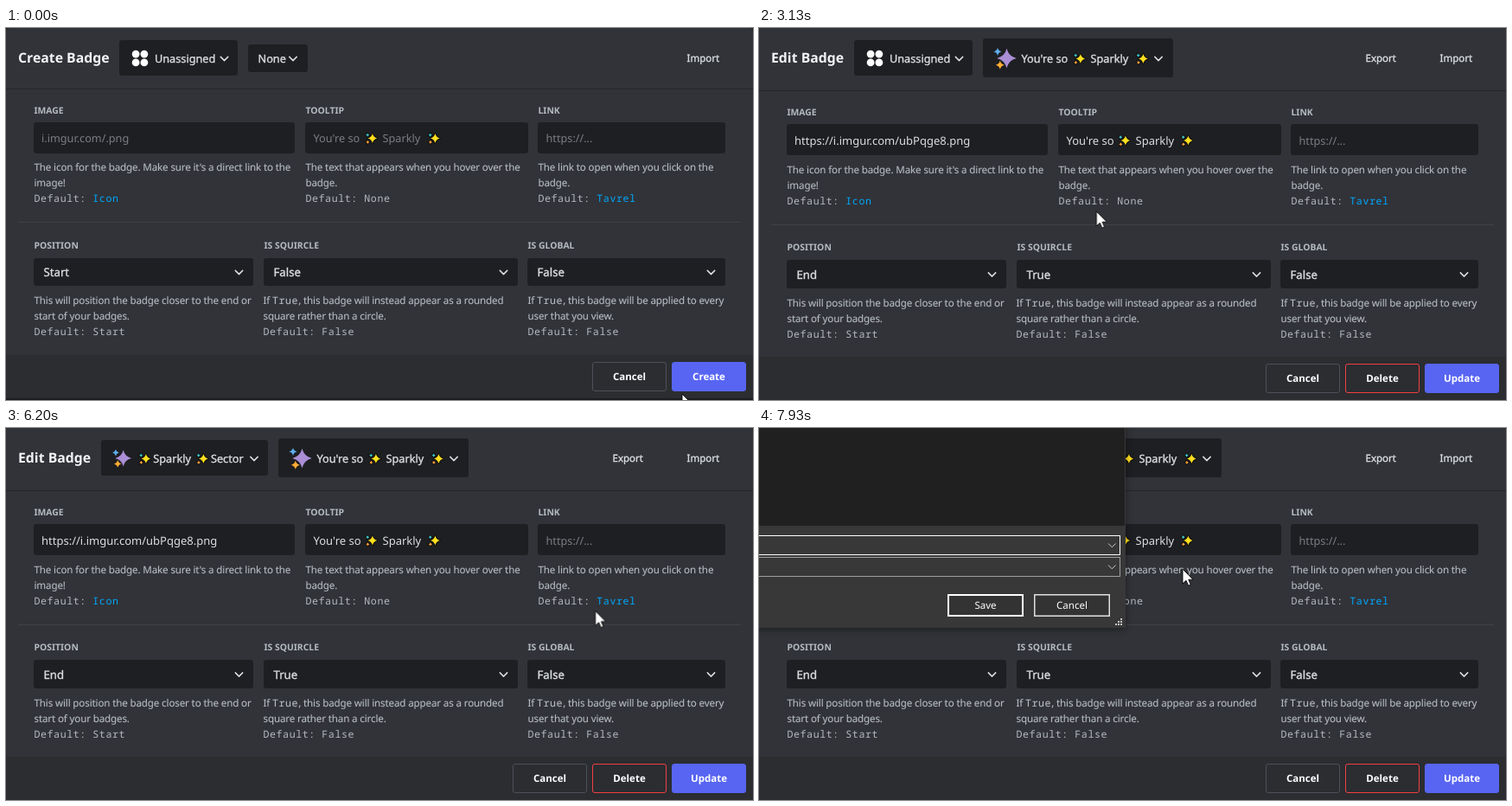
An HTML page for the animation above (8 s loop, 864x430 px).

```html
<!DOCTYPE html>
<html lang="en">
<head>
<meta charset="utf-8">
<title>Badge editor</title>
<style>
html, body { margin: 0; width: 100%; height: 100%; overflow: hidden; background: #1b1c1f; }
svg { display: block; width: 100%; height: 100%; }
text { font: 12.7px "Noto Sans", "Open Sans", sans-serif; fill: #dbdee1; text-rendering: geometricPrecision; white-space: pre; }
.title { font-size: 15.8px; font-weight: 700; fill: #f2f3f5; }
.label { font-size: 10.4px; font-weight: 700; fill: #b5bac1; }
.help { font-size: 11.6px; letter-spacing: -.14px; fill: #b5bac1; stroke: #b5bac1; stroke-width: .12px; }
.mono { font-family: "Noto Sans Mono", "DejaVu Sans Mono", monospace; font-size: 11.6px; letter-spacing: .58px; fill: #b5bac1; }
.link { fill: #00a8fc; }
.hint { font-size: 12.7px; fill: #7a7d84; }
.value { font-size: 13px; }
.pick { font-size: 13.2px; }
.nav { font-size: 11.5px; }
.pick, .head, .nav { stroke: #dbdee1; stroke-width: .35px; }
.btn { font-size: 11.5px; font-weight: 600; fill: #fff; text-anchor: middle; }
.row { font-size: 12.8px; fill: #a9adb4; }
.strong { font-size: 12.3px; font-weight: 600; }
.white { fill: #fff; }
.win { font-size: 11.5px; fill: #fff; text-anchor: middle; }
.chev { fill: none; stroke: #dbdee1; stroke-width: 1.5; stroke-linecap: round; stroke-linejoin: round; }
.timed { animation: 8s step-end infinite; }
#cursor { animation: move 8s linear infinite; }
#dialog { filter: drop-shadow(0 2px 4px rgba(0, 0, 0, .4)); }
</style>
</head>
<body>
<svg id="stage" viewBox="0 0 864 430" xmlns="http://www.w3.org/2000/svg"></svg>
<script>
const LOOP = 8000;
const DARK = '#1e1f22', PANEL = '#2b2d31', BLURPLE = '#5865f2';

const text = (x, y, s, cls) => `<text x="${x}" y="${y}" class="${cls}">${s}</text>`;
const rect = (x, y, x2, y2, fill, rest = '') =>
  `<rect x="${x}" y="${y}" width="${x2 - x}" height="${y2 - y}" fill="${fill}" ${rest}/>`;
const outline = (x, y, x2, y2, fill, color, w = 1, rx = 0) =>
  rect(x + w / 2, y + w / 2, x2 - w / 2, y2 - w / 2, fill, `stroke="${color}" stroke-width="${w}" rx="${rx}"`);
const chevron = (x, y, up) =>
  `<path class="chev" d="M${x - 4.2} ${y + (up ? 2.1 : -2.1)}l4.2 ${up ? -4.2 : 4.2} 4.2 ${up ? 4.2 : -4.2}"/>`;
const timed = (id, body) => `<g id="${id}" class="timed">${body}</g>`;

function star(x, y, r, fill, edge = '') {
  const k = r * .2;
  return `<path transform="translate(${x} ${y})" fill="${fill}" ${edge}
    d="M0 ${-r}Q${k} ${-k} ${r} 0Q${k} ${k} 0 ${r}Q${-k} ${k} ${-r} 0Q${-k} ${-k} 0 ${-r}Z"/>`;
}

function emoji(x, y) {
  const edge = 'stroke="#101010" stroke-width="2" stroke-linejoin="round" paint-order="stroke"';
  return star(x - 4.3, y - 3.8, 2.1, '#3fc6c9', edge) + star(x - 4.1, y + 4.4, 2.1, '#f7a03c', edge) +
    star(x + 1.4, y, 5.4, '#ffdf1e', edge);
}

// Purple sparkle icon, about 25px wide at scale 1
const sparkle = (x, y, s = 1) => `<g transform="translate(${x} ${y}) scale(${s})">` +
  star(2, 0, 11.3, '#aa8ed6') + star(-8.5, -7.7, 4.6, '#5dadec') + star(-5.7, 7.8, 5, '#ffac33') + '</g>';

const dots = (x, y) => [[-4.9, -4.9], [4.9, -4.9], [-4.9, 4.9], [4.9, 4.9]]
  .map(([a, b]) => `<circle cx="${x + a}" cy="${y + b}" r="4.4" fill="#fff"/>`).join('');

const rosette = (x, y) => `<g transform="translate(${x} ${y})" fill="#fff">
  <path d="M-6 4L-9.5 13.5L-5 12.5L-2.2 15L0 9L2.2 15L5 12.5L9.5 13.5L6 4Z"/>
  <circle cy="-2" r="10.8"/><circle cy="-2" r="8" fill="none" stroke="${PANEL}" stroke-width="1.6"/></g>`;

const check = (x, y) => `<circle cx="${x}" cy="${y}" r="8.3" fill="${BLURPLE}"/>
  <path d="M${x - 3.7} ${y + .2}l2.6 2.7 4.8-5.2" fill="none" stroke="#fff" stroke-width="1.7"/>`;

function button(x, y, label, fill, edge) {
  return outline(x, y, x + 86, y + 34, fill, edge, 1, 2.5) + text(x + 43, y + 21, label, 'btn');
}

function help(x, y, lines, value, link) {
  return lines.map((s, i) => text(x, y + 18 * i, s, 'help')).join('') +
    text(x, y + 36, `Default: <tspan class="${link ? 'link' : ''}">${value}</tspan>`, 'mono');
}

const sparkly = (x, y, cls) => text(x, y, "You're so", cls) + emoji(x + 67, y - 4.5) +
  text(x + 80, y, 'Sparkly', cls) + emoji(x + 139.5, y - 4.5);

// Modal body shared by both modes; d shifts boxes and t shifts text
function form(edit) {
  const d = edit ? 2 : 0, t = edit ? 2.5 : 0;
  const cols = [[32, 334], [346, 604], [615, 832]], picks = [[32, 286], [298, 592], [603, 832]];
  const chosen = edit ? ['End', 'True', 'False'] : ['Start', 'False', 'False'];
  const code = s => `If <tspan class="mono">True</tspan>, ${s}`;
  const rule = Math.round(224 + t);
  let s = rect(0, -d, 864, 428 + d, '#313338', 'rx="4"') +
    rect(0, 378 + d, 864, 428 + d, PANEL) +
    rect(0, 70 + d, 864, 71 + d, '#25262a') + rect(14, rule, 850, rule + 1, '#3f4147');
  cols.forEach(([a, b], i) => {
    s += rect(a, 109 + d, b, 145 + d, DARK, 'rx="3"') +
      text(a + .5, 99 + d, ['IMAGE', 'TOOLTIP', 'LINK'][i], 'label');
  });
  picks.forEach(([a, b], i) => {
    s += rect(a, 266 + d, b, Math.round(298 + t), DARK, 'rx="3"') +
      text(a + .5, 255 + d, ['POSITION', 'IS SQUIRCLE', 'IS GLOBAL'][i], 'label') +
      text(a + 11.5, 287 + t, chosen[i], 'pick') + chevron(b - 16.5, 282.5 + t);
  });
  const cls = edit ? 'value' : 'hint';
  s += text(41, 132 + t, edit ? 'https://i.imgur.com/ubPqge8.png' : 'i.imgur.com/.png', cls) +
    sparkly(355.5, 132 + t, cls) + text(624.5, 132 + t, 'https://...', 'hint') +
    help(32.5, 165 + t, ["The icon for the badge. Make sure it's a direct link to the", 'image!'], 'Icon', true) +
    help(346.5, 165 + t, ['The text that appears when you hover over the', 'badge.'], 'None') +
    help(615.5, 165 + t, ['The link to open when you click on the', 'badge.'], 'Tavrel', true) +
    help(32.5, 319 + t, ['This will position the badge closer to the end or', 'start of your badges.'], 'Start') +
    help(297.5, 319 + t, [code('this badge will instead appear as a rounded'), 'square rather than a circle.'], 'False') +
    help(603.5, 319 + t, [code('this badge will be applied to every'), 'user that you view.'], 'False') +
    text(14, 40, edit ? 'Edit Badge' : 'Create Badge', 'title') + text(787.5, 39, 'Import', 'nav') +
    button(edit ? 586 : 678, 386 + d, 'Cancel', 'none', '#4e5058') +
    button(770, 386 + d, edit ? 'Update' : 'Create', BLURPLE, BLURPLE);
  if (edit) s += button(678, 388, 'Delete', 'none', '#f23f43') + text(701.5, 39, 'Export', 'nav');
  return s;
}

const groupBox = x => rect(x, 14, x + 137, 55, DARK, 'rx="3"') + dots(x + 24, 35) +
  text(x + 41, 40, 'Unassigned', 'head') + chevron(x + 121.5, 35.5);

const badgeBox = x => rect(x, 12, x + 220, 57, DARK, 'rx="3"') + sparkle(x + 25.5, 35) +
  sparkly(x + 44.5, 40, 'head') + chevron(x + 203, 35.5);

const sector = (x, y, cls) => sparkle(x - 19, y - 5, .83) + emoji(x + 7.5, y - 4.5) +
  text(x + 17.3, y, 'Sparkly', cls) + emoji(x + 74, y - 4.5) + text(x + 84, y, 'Sector', cls);

// Opened list: square off the box above it and flip its chevron
const opened = (x, y, x2, cx) => rect(x, y - 4, x2, y, DARK) + rect(cx - 7, 29, cx + 7, 42, DARK) + chevron(cx, 35, true);

function badgeMenu() {
  const row2 = cls => rosette(307, 116) + text(325, 122, 'Test', cls);
  const row3 = cls => sparkle(307, 168) + sparkly(325, 172, cls);
  return opened(280, 51, 349, 332) + outline(280, 51, 523, 193, PANEL, '#1c1d20') +
    rect(281, 52, 522, 92, '#404249') + text(291.5, 77, 'None', 'row strong white') + check(502, 72) +
    row2('row') + row3('row') +
    timed('badge2', rect(281, 92, 522, 142, '#35373c') + row2('strong')) +
    timed('badge3', rect(281, 142, 522, 192, '#35373c') + row3('strong'));
}

function groupMenu() {
  const row2 = cls => dots(135, 125) + text(151.5, 130, 'Testing', cls);
  return opened(110, 55, 247, 231.5) + outline(111, 55, 354, 195, PANEL, '#1c1d20') +
    rect(112, 56, 353, 102, '#404249') + dots(135, 79) +
    text(151.5, 84, 'Unassigned', 'row strong white') + check(333, 79) +
    row2('row') + sector(153.5, 176, 'row') +
    timed('group2', rect(112, 102, 353, 148, '#35373c') + row2('strong')) +
    timed('group3', rect(112, 148, 353, 194, '#35373c') + sector(153.5, 176, 'strong'));
}

function dialog() {
  let s = rect(-10, -10, 424, 231, '#383838') + rect(-10, -10, 423, 113, '#202020') +
    outline(-10, 124, 418, 147, '#383838', '#fff') + outline(-10, 149, 418, 172, '#383838', '#a0a0a0') +
    outline(218, 192, 306, 218, '#333', '#fff', 2) + outline(318, 192, 406, 218, '#333', '#e0e0e0', 1.5) +
    text(262, 209, 'Save', 'win') + text(362, 209, 'Cancel', 'win');
  for (const y of [135.5, 160.5])
    s += `<path d="M404 ${y - 2}l4.3 4.3 4.3-4.3" fill="none" stroke="#ccc"/>`;
  for (let i = 0; i < 3; i++)
    for (let j = 2 - i; j < 3; j++) s += rect(412 + 3 * j, 220 + 3 * i, 414 + 3 * j, 222 + 3 * i, '#c4c4c4');
  return s;
}

const arrow = `<path d="M0 0V17L4 13.3L6.6 19.2L9.3 18L6.8 12.2H12Z" fill="#fff" stroke="#000" stroke-width=".9"/>`;
const hand = `<path transform="translate(-6 0)" fill="#fff" stroke="#000" d="M4.6 2C4.6 .2 7.6 .2 7.6 2V7.2C8.4 6.6 10 6.8 10.4 7.8
  C11.4 7.2 12.8 7.6 13 8.7C14.2 8.2 15.4 9 15.4 10.2V15C15.4 17 14 18.5 13.6 21.5H5.8C5.4 19 1.6 15.5 .8 13.2
  C.3 11.5 2.2 10.8 3.2 12L4.6 13.6Z"/><path d="M4.4 8V12M7 8.8V12" stroke="#000" stroke-width=".7"/>`;

stage.innerHTML =
  timed('create', form(false) + groupBox(131) + rect(280, 19, 349, 51, DARK, 'rx="3"') +
    text(291.5, 40, 'None', 'head') + chevron(332, 35.5)) +
  timed('edit', form(true)) +
  timed('plain', groupBox(110) + badgeBox(259)) +
  timed('sorted', rect(110, 14, 303, 55, DARK, 'rx="3"') + sector(153, 40, 'head') +
    chevron(287, 35.5) + badgeBox(315)) +
  timed('badges', badgeMenu()) + timed('groups', groupMenu()) +
  timed('underline', rect(702, 40, 738, 41, '#dbdee1')) +
  timed('dialog', dialog()) +
  `<g id="cursor">${timed('arrow', arrow)}${timed('hand', hand)}</g>`;

// When each part is on screen, in ms
const spans = {
  create: [[0, 2600]], edit: [[2600, LOOP]], plain: [[2600, 5528]], sorted: [[5528, LOOP]],
  badges: [[1467, 2600]], badge2: [[1730, 1930]], badge3: [[1930, 2600]],
  groups: [[4397, 5528]], group2: [[4660, 4860]], group3: [[4860, 5528]],
  underline: [[6950, 7330]], dialog: [[7467, LOOP]],
  arrow: [[0, 970], [2464, 4060], [5600, 6950], [7264, LOOP]],
  hand: [[970, 2464], [4060, 5600], [6950, 7264]]
};

// Pointer path: time, x, y, easing towards the next point
const path = [
  [0, 782, 423, 'step-end'], [66, 782, 445, 'step-end'], [128, 465, 395],
  [465, 465, 395, 'ease-in'], [700, 340, 255], [1000, 136, 62], [1264, 307, 33],
  [1467, 307, 33, 'ease-in-out'], [2264, 372, 178], [2400, 372, 178], [2466, 373, 171],
  [2620, 373, 171, 'ease-in-out'], [3266, 392, 216],
  [3325, 392, 216, 'ease-out'], [3528, 203, 153],
  [3795, 203, 153, 'ease-in'], [3960, 168, 100], [4128, 178, 56], [4200, 178, 56], [4266, 179, 53],
  [4397, 179, 53, 'ease-in-out'], [5066, 211, 177], [5195, 211, 177], [5264, 219, 177],
  [5540, 219, 177, 'ease-in-out'], [6266, 689, 212],
  [6395, 689, 212, 'ease-in'], [6560, 690, 165], [6820, 759, 88], [7100, 728, 42], [7195, 728, 40],
  [7264, 729, 60], [7275, 729, 60, 'ease-in-out'], [7925, 490, 163], [LOOP, 490, 163]
];

const pct = ms => (ms / LOOP * 100).toFixed(4) + '%';
let css = '';
for (const [id, list] of Object.entries(spans)) {
  const keys = list.map(([a, b]) =>
    `${pct(a)}{opacity:1}` + (b < LOOP ? `${pct(b)}{opacity:0}` : '100%{opacity:1}')).join('');
  css += `@keyframes ${id}{${list[0][0] ? '0%{opacity:0}' : ''}${keys}` +
    `${list[list.length - 1][1] < LOOP ? '100%{opacity:0}' : ''}}#${id}{animation-name:${id}}`;
}
css += '@keyframes move{' + path.map(([t, x, y, ease = 'linear']) =>
  `${pct(t)}{transform:translate(${x}px,${y}px);animation-timing-function:${ease}}`).join('') + '}';
document.head.appendChild(document.createElement('style')).textContent = css;
</script>
</body>
</html>
```
